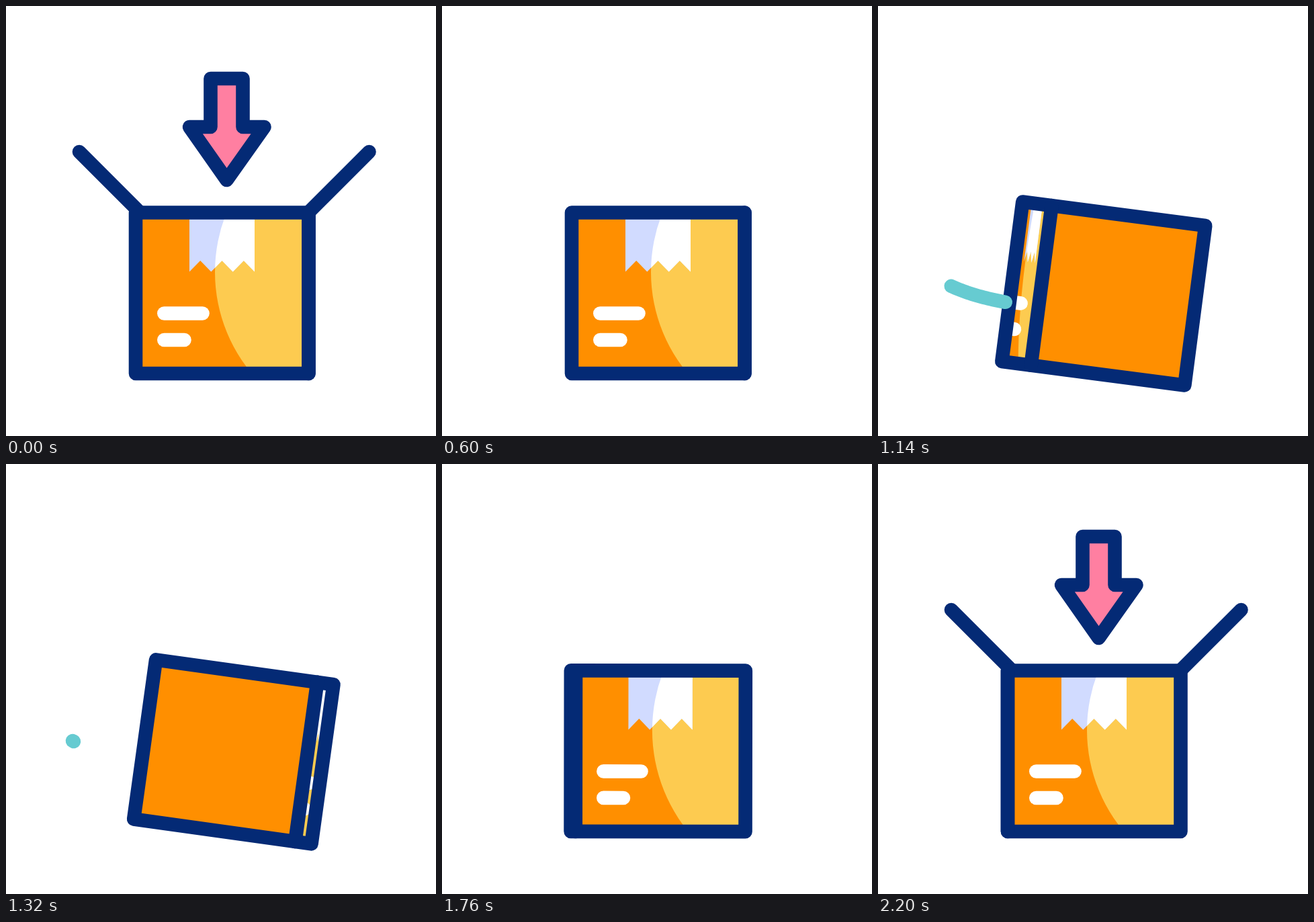
Animation, 640 px wide and 640 px high, one loop 2.42 s. Source, as an HTML page with a canvas:

```html
<!DOCTYPE html>
<html lang="en">
<head>
<meta charset="utf-8">
<title>Parcel</title>
<style>
  html, body { margin: 0; width: 100%; height: 100%; overflow: hidden; background: #fff; }
  canvas { display: block; width: 640px; height: 640px; }
</style>
</head>
<body>
<canvas id="stage" width="640" height="640"></canvas>
<script>
const ctx = document.getElementById('stage').getContext('2d');
const LOOP = 2420, LINE = 20.6;
const NAVY = '#042a75', ORANGE = '#ff8f00', YELLOW = '#fdcb50',
      LILAC = '#d1dbff', PINK = '#ff7fa1', TEAL = '#66cbd1', WHITE = '#fff';
const BOX = { x: 193, y: 307.5, w: 257.5, h: 239.5 };
const PIVOT = { x: 321.75, y: 557 };
const FLAP = 128;
const TILT = [[700, 0], [960, 3.1], [1140, 7.4], [1230, 9.4], [1480, 4.3], [1620, 2.4], [1780, 0]];
// Quarter turns: knee is the incoming side's share halfway, drift the sideways slip.
const TURN_1 = { from: 700, to: 1270, knee: 0.6, drift: 42 };
const TURN_2 = { from: 1215, to: 1813, knee: 0.57, drift: 22 };
const SWITCH = 1245;

const part = (t, from, to) => Math.min(1, Math.max(0, (t - from) / (to - from)));
const ease = (t, from, to) => { const p = part(t, from, to); return p * p * (3 - 2 * p); };
const mix = (a, b, p) => a + (b - a) * p;

// Smooth curve through [time, value] knots, flat at both ends.
function track(knots, t) {
  const last = knots.length - 1;
  if (t <= knots[0][0]) return knots[0][1];
  if (t >= knots[last][0]) return knots[last][1];
  const slope = k => k < 1 || k >= last ? 0 :
    (knots[k + 1][1] - knots[k - 1][1]) / (knots[k + 1][0] - knots[k - 1][0]);
  let i = 0;
  while (t > knots[i + 1][0]) i++;
  const [t0, a] = knots[i], [t1, b] = knots[i + 1];
  const d = t1 - t0, p = (t - t0) / d, q = 1 - p;
  return a + (b - a) * p * p * (3 - 2 * p) + d * p * q * (q * slope(i) - p * slope(i + 1));
}

function trace(points, closed) {
  ctx.beginPath();
  points.forEach(([x, y]) => ctx.lineTo(x, y));
  if (closed) ctx.closePath();
}

function line(points, color) {
  trace(points);
  ctx.strokeStyle = color;
  ctx.stroke();
}

function drawArrow(t) {
  let dy = 0;
  if (t < 300) dy = -26 * ease(t, 0, 300);
  else if (t < 600) dy = mix(-26, 230, ease(t, 300, 560));
  else if (t < 1800) return;
  else dy = -270 * (1 - ease(t, 1800, 2200));
  trace([[304.5, 108], [352.5, 108], [352.5, 180], [384.5, 180],
         [328.5, 259], [273, 180], [304.5, 180]].map(([x, y]) => [x, y + dy]), true);
  ctx.fillStyle = PINK;
  ctx.fill();
  ctx.strokeStyle = NAVY;
  ctx.stroke();
}

function drawFlaps(t) {
  if (t >= 600 && t < 1915) return;
  let deg;
  if (t < 420) deg = mix(45, 34.5, ease(t, 0, 400));
  else if (t < 600) deg = mix(34.5, 180, part(t, 420, 600) ** 2.4);
  else deg = mix(180, 45, ease(t, 1915, 2200));
  const a = deg * Math.PI / 180, dx = FLAP * Math.cos(a), y = BOX.y - FLAP * Math.sin(a);
  line([[199.5, BOX.y], [199.5 - dx, y]], NAVY);
  line([[450, BOX.y], [450 + dx, y]], NAVY);
}

// The labelled side, squeezed to width w; bend shifts the shaded edge.
function drawFront(left, w, bend) {
  const k = w / BOX.w, at = x => left + (x - BOX.x) * k;
  const shade = () => {
    ctx.beginPath();
    ctx.ellipse(at(547) + bend * w, 396, 236 * k, 236, 0, 0, 7);
    ctx.rect(at(547) + bend * w, BOX.y, w, BOX.h);
  };
  const tape = [[273, 312], [273, 395.5]];
  for (let i = 1; i <= 6; i++) tape.push([273 + i * 97 / 6, i % 2 ? 379 : 395.5]);
  tape.push([370, 312]);

  ctx.save();
  ctx.beginPath();
  ctx.rect(left, BOX.y, w, BOX.h);
  ctx.clip();
  ctx.fillStyle = ORANGE;
  ctx.fill();
  shade();
  ctx.fillStyle = YELLOW;
  ctx.fill();

  ctx.save();
  trace(tape.map(([x, y]) => [at(x), y]), true);
  ctx.fillStyle = LILAC;
  ctx.fill();
  ctx.clip();
  shade();
  ctx.fillStyle = WHITE;
  ctx.fill();
  ctx.restore();

  line([[at(235.3), 457.5], [at(292.5), 457.5]], WHITE);
  line([[at(235.3), 497], [at(265.5), 497]], WHITE);
  ctx.restore();
}

function drawPlain(left, w) {
  ctx.fillStyle = ORANGE;
  ctx.fillRect(left, BOX.y, w, BOX.h);
}

function drawBox(t) {
  const second = t >= SWITCH;
  const { from, to, knee, drift } = second ? TURN_2 : TURN_1;
  const s = ease(t, from, to);
  // Side going out and side coming in, as shares of the full width.
  const out = s < 0.5 ? 1 - 0.7 * s : 1.3 * (1 - s);
  const into = s < 0.5 ? 2 * knee * s : mix(knee, 1, 2 * s - 1);
  const a = out * BOX.w, b = into * BOX.w;
  const left = PIVOT.x - drift * (out + into - 1) - (a + b) / 2;

  ctx.save();
  ctx.translate(PIVOT.x, PIVOT.y);
  ctx.rotate(track(TILT, t) * Math.PI / 180);
  ctx.translate(-PIVOT.x, -PIVOT.y);
  if (second) {
    drawPlain(left, a);
    drawFront(left + a, b, -0.345 * (1 - s));
  } else {
    drawFront(left, a, -0.12 * s);
    drawPlain(left + a, b);
  }
  ctx.strokeStyle = NAVY;
  ctx.beginPath();
  ctx.rect(left, BOX.y, a + b, BOX.h);
  ctx.stroke();
  line([[left + a, BOX.y], [left + a, BOX.y + BOX.h]], NAVY);
  ctx.restore();
}

function drawStreak(t) {
  const head = ease(t, 740, 1195), tail = ease(t, 790, 1350);
  if (head <= 0 || tail >= 1) return;
  const cubic = (p, a, b, c, d) => {
    const q = 1 - p;
    return q * q * q * a + 3 * q * q * p * b + 3 * q * p * p * c + p * p * p * d;
  };
  const points = [];
  for (let i = 0; i <= 24; i++) {
    const p = mix(tail, head, i / 24);
    points.push([cubic(p, 420, 320, 180, 99), cubic(p, 457, 453, 455, 412)]);
  }
  line(points, TEAL);
}

function draw(t) {
  ctx.fillStyle = WHITE;
  ctx.fillRect(0, 0, 640, 640);
  ctx.lineWidth = LINE;
  ctx.lineCap = ctx.lineJoin = 'round';
  drawArrow(t);
  drawFlaps(t);
  drawBox(t);
  drawStreak(t);
}

const start = performance.now();
function tick() {
  draw((performance.now() - start) % LOOP);
  requestAnimationFrame(tick);
}
tick();
</script>
</body>
</html>
```
